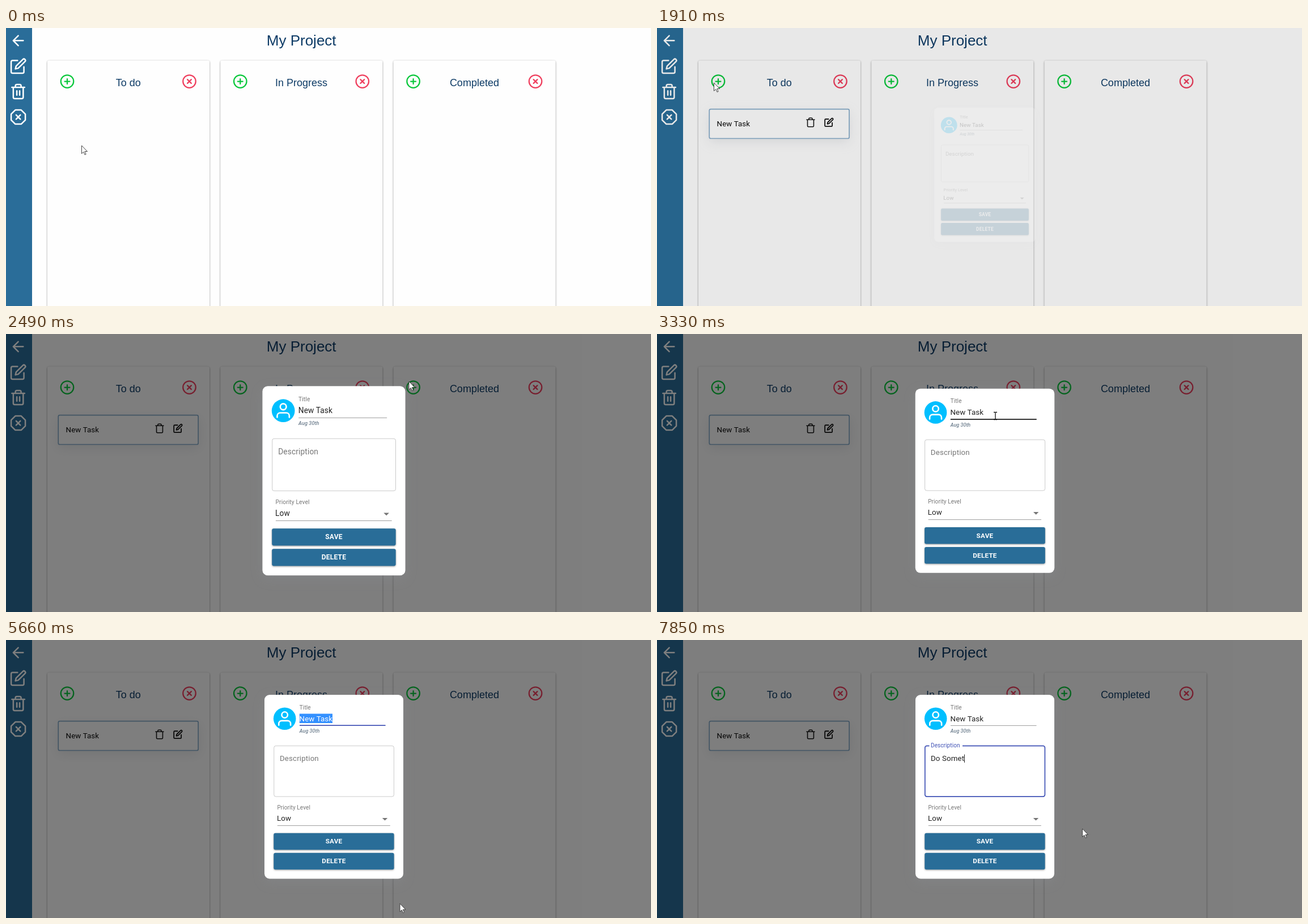
Recreate the animation shown at these times as an HTML page. Size 1138 by 492 pixels, loop 8000 ms.

```html
<!DOCTYPE html>
<html lang="en">
<head>
<meta charset="utf-8">
<title>Project board</title>
<style>
  html, body { margin: 0; width: 100%; height: 100%; overflow: hidden; background: #fefefe; }
  svg { display: block; }
  .icon { fill: none; stroke-width: 2; stroke-linecap: round; stroke-linejoin: round; }
  .board { font: 18px "Liberation Sans", Arial, sans-serif; fill: #0d3b66; text-anchor: middle; }
  .board.title { font-size: 26px; }
  .column { fill: #fefefe; filter: drop-shadow(0 1px 1.5px rgba(0,0,0,.45)); }
  .glow { filter: drop-shadow(0 6.7px 10px rgba(149,157,165,.2)); }
  .body { font: 13.33px Roboto, sans-serif; letter-spacing: .00938em; fill: rgba(0,0,0,.87); white-space: pre; }
  .label { font: 10px Roboto, sans-serif; letter-spacing: .00938em; fill: rgba(0,0,0,.54); }
  .date { font: italic 500 9px Roboto, sans-serif; fill: #708090; }
  .line { fill: #000; fill-opacity: .42; }
  .button rect { fill: #296d98; filter: drop-shadow(0 1.2px 1.4px rgba(0,0,0,.38)); }
  .button text { font: 700 11.67px Roboto, sans-serif; letter-spacing: .02em; fill: #fff; text-anchor: middle; }
</style>
</head>
<body>
<svg width="1138" height="492" viewBox="0 0 1138 492">
  <defs>
    <g id="arrow"><path d="M19 12H5M12 19L5 12L12 5"/></g>
    <g id="edit"><path d="M11 4H4a2 2 0 0 0-2 2v14a2 2 0 0 0 2 2h14a2 2 0 0 0 2-2v-7"/><path d="M18.5 2.5a2.121 2.121 0 0 1 3 3L12 15l-4 1 1-4z"/></g>
    <g id="bin"><path d="M3 6H21M19 6v14a2 2 0 0 1-2 2H7a2 2 0 0 1-2-2V6M8 6V4a2 2 0 0 1 2-2h4a2 2 0 0 1 2 2v2"/></g>
    <g id="binLines"><use href="#bin"/><path d="M10 11v6M14 11v6"/></g>
    <g id="octagon"><path d="M7.86 2h8.28L22 7.86v8.28L16.14 22H7.86L2 16.14V7.86zM15 9l-6 6M9 9l6 6"/></g>
    <g id="plus"><circle cx="12" cy="12" r="10"/><path d="M12 8v8M8 12h8"/></g>
    <g id="cross"><circle cx="12" cy="12" r="10"/><path d="M15 9l-6 6M9 9l6 6"/></g>
    <g id="user"><path d="M20 21v-2a4 4 0 0 0-4-4H8a4 4 0 0 0-4 4v2"/><circle cx="12" cy="7" r="4"/></g>
    <clipPath id="selClip"><rect id="selClipBox" y="130.5" height="16.5"/></clipPath>
  </defs>

  <rect width="1138" height="492" fill="#fefefe"/>
  <rect width="46" height="492" fill="#2a6d99"/>
  <g id="sidebar"></g>
  <text class="board title" x="521.2" y="31">My Project</text>
  <g id="columns"></g>

  <g id="task">
    <rect class="glow" x="92.3" y="143.6" width="246.9" height="51.9" rx="2.5" fill="#fefefe" stroke="#85abc9" stroke-width="1.7"/>
    <text class="body" x="105.5" y="174" style="fill:#0a0a0a">New Task</text>
    <g id="taskIcons"></g>
  </g>

  <rect id="shade" width="1138" height="492"/>
  <g id="dialog">
    <rect class="glow" x="456" y="97" width="245" height="325.5" rx="9" fill="#fff"/>
    <circle cx="491.7" cy="139.2" r="19.8" fill="#00bfff"/>
    <g id="avatar"></g>
    <text class="label" x="517.8" y="122.7">Title</text>
    <text class="body" x="517.5" y="143.6">New Task</text>
    <rect id="selection" y="130.5" height="16.5" fill="#3390ff"/>
    <text class="body" x="517.5" y="143.6" style="fill:#fff" clip-path="url(#selClip)">New Task</text>
    <rect class="line" x="518" y="151" width="151.5" height=".9"/>
    <rect id="hoverLine" x="518" y="150.3" width="151.5" height="1.7" fill="#000" fill-opacity=".87"/>
    <rect id="focusLine" y="150.3" height="1.7" fill="#3f51b5"/>
    <text class="date" x="517.8" y="164">Aug 30th</text>

    <rect id="area" x="472.8" y="187.3" width="211.6" height="89.8" rx="3.3" fill="none"/>
    <rect id="notch" x="480.5" y="185" height="5" fill="#fff"/>
    <text class="body" id="areaLabel">Description</text>
    <text class="body" id="typed" x="483" y="214"></text>
    <rect id="caret" y="202.5" width="1" height="14.5" fill="#222"/>

    <text class="label" x="478.4" y="300">Priority Level</text>
    <text class="body" x="478" y="320">Low</text>
    <path d="M663.8 315h9.4l-4.7 4.6z" fill="#000" fill-opacity=".54"/>
    <rect class="line" x="478.8" y="328" width="199" height=".9"/>
    <g class="button" id="buttons"></g>
  </g>

  <g id="pointer">
    <path id="tip" d="M0 0V14.3L3.3 11.3L5.5 16.3L7.6 15.4L5.4 10.5H10z" fill="#fff" stroke="#333" stroke-width=".9"/>
    <path id="beam" d="M-3 -6.5H-.8L0 -6L.8 -6.5H3M0 -6V6M-3 6.5H-.8L0 6L.8 6.5H3" fill="none" stroke="#111" stroke-width="1.3"/>
  </g>
</svg>
<script>
const LOOP = 8000;
const HOVER = 1675, OPEN = 1880, TASK = 1900, FOCUS_TITLE = 3400, FOCUS_AREA = 6085;

const $ = id => document.getElementById(id);
const set = (id, attrs) => { for (const k in attrs) $(id).setAttribute(k, attrs[k]); };
const show = (id, on) => set(id, { display: on ? "inline" : "none" });
const mix = (a, b, k) => a + (b - a) * k;
const part = (t, from, to) => Math.max(0, Math.min(1, (t - from) / (to - from)));
const ease = k => k * k * (3 - 2 * k);

// Icons use a 24-unit grid and are placed by their centre.
const place = (x, y, s) => `translate(${x} ${y}) scale(${s}) translate(-12 -12)`;
const icon = (name, x, y, s, color, extra = "") =>
  `<g class="icon" stroke="${color}" transform="${place(x, y, s)}" ${extra}><use href="#${name}"/></g>`;

$("sidebar").innerHTML = ["arrow", "edit", "binLines", "octagon"]
  .map((name, i) => icon(name, 21.6, 22.3 + i * 45.1, 1.25, "#fff")).join("");

$("columns").innerHTML = ["To do", "In Progress", "Completed"].map((name, i) => {
  const x = 73 + i * 305.3;
  return `<rect class="column" x="${x}" y="57.5" width="286" height="460" rx="3"/>` +
    icon("plus", x + 35, 94.5, 1.125, "#0ac83c", `id="plus${i}"`) +
    icon("cross", x + 250.5, 94.5, 1.125, "#ef3f5e") +
    `<text class="board" x="${x + 142.8}" y="103">${name}</text>`;
}).join("");

$("taskIcons").innerHTML = icon("bin", 271, 167, .78, "#111") +
  icon("edit", 303.4, 167, .72, "#111", 'style="stroke-width:2.5"');
$("avatar").innerHTML = icon("user", 491.7, 139, 1.3, "#fff");
$("buttons").innerHTML = ["SAVE", "DELETE"].map((name, i) => {
  const y = 341.8 + i * 35;
  return `<rect x="472.3" y="${y}" width="212.3" height="29.4" rx="3"/>` +
    `<text x="578.5" y="${y + 18.6}">${name}</text>`;
}).join("");

// Pointer moves: start, end, and where it comes to rest.
const moves = [
  [70, 140, 95, 172], [290, 450, 124, 195], [600, 1080, 39, 108], [1080, 1520, 98.5, 98],
  [1680, 1760, 100.5, 97], [2000, 2070, 103.7, 97], [2080, 2390, 711, 84],
  [2490, 3200, 597, 145], [3410, 3650, 508, 145], [3650, 3950, 705, 398],
  [4400, 4410, 803, 466], [5500, 5650, 695, 466.5], [5660, 6000, 562, 225], [6100, 6360, 750.5, 334]
];
const pointerAt = t => moves.reduce(([x, y], [from, to, tx, ty]) => {
  const k = ease(part(t, from, to));
  return [mix(x, tx, k), mix(y, ty, k)];
}, [133.5, 208]);

function drawPointer(t) {
  const [x, y] = pointerAt(t);
  const over = (l, top, r, b) => t > OPEN && x > l && x < r && y > top && y < b;
  const inTitle = over(517, 130, 670, 153);
  const beam = inTitle || over(473, 187, 685, 277);
  const away = (t > 3950 && t < 4410) || (t > 4495 && t < 5655);
  set("pointer", { transform: `translate(${x} ${y})` });
  show("pointer", !away);
  show("tip", !beam);
  show("beam", beam);
  show("hoverLine", inTitle && t < FOCUS_TITLE);
}

function drawDialog(t) {
  const age = Math.max(0, t - OPEN);
  const alpha = part(age, 0, 180);
  // Quick growth, then a slow settle from the overshoot.
  const scale = 1 + .203 * Math.exp(-age / 314) - .851 * Math.exp(-age / 49.5);
  show("task", t >= TASK);
  show("dialog", t >= TASK);
  set("shade", { "fill-opacity": t >= TASK ? alpha / 2 : 0 });
  set("dialog", { opacity: alpha, transform: `translate(578.5 259.8) scale(${scale}) translate(-578.5 -259.8)` });
}

function drawTitleField(t) {
  const focused = t >= FOCUS_TITLE && t < FOCUS_AREA;
  const from = mix(576, 517.8, focused ? part(t, 3440, 3625) : 0);
  const range = { x: from, width: 576 - from };
  set("selection", range);
  set("selClipBox", range);
  const half = focused ? 75.75 * ease(part(t, FOCUS_TITLE, FOCUS_TITLE + 200)) : 0;
  set("focusLine", { x: 593.75 - half, width: 2 * half });
}

const phrase = "Do Somet";
const keyTimes = [6755, 6995, 7065, 7455, 7605, 7605, 7695, 7845];

function drawArea(t) {
  const focused = t >= FOCUS_AREA;
  const k = ease(part(t, FOCUS_AREA, FOCUS_AREA + 200));
  set("area", {
    stroke: focused ? "#3f51b5" : "#000",
    "stroke-opacity": focused ? 1 : .23,
    "stroke-width": focused ? 1.7 : .9
  });
  set("notch", { width: 58.5 * k });
  set("areaLabel", { transform: `translate(483 ${mix(214, 190, k)}) scale(${mix(1, .75, k)})` });
  $("areaLabel").style.fill = focused ? "#3f51b5" : "rgba(0,0,0,.54)";

  const pressed = keyTimes.filter(at => t >= at);
  $("typed").textContent = phrase.slice(0, pressed.length);
  const lastInput = Math.max(FOCUS_AREA, ...pressed);
  set("caret", { x: 482.7 + $("typed").getComputedTextLength() });
  show("caret", focused && (t - lastInput) % 1000 < 500);
}

function draw(t) {
  const hovered = t >= HOVER && t < TASK;
  set("plus0", { transform: place(hovered ? 107.5 : 108, 94.5, hovered ? 1.23 : 1.125) });
  drawDialog(t);
  drawTitleField(t);
  drawArea(t);
  drawPointer(t);
}

function loop() {
  draw(performance.now() % LOOP);
  requestAnimationFrame(loop);
}
loop();
</script>
</body>
</html>
```
